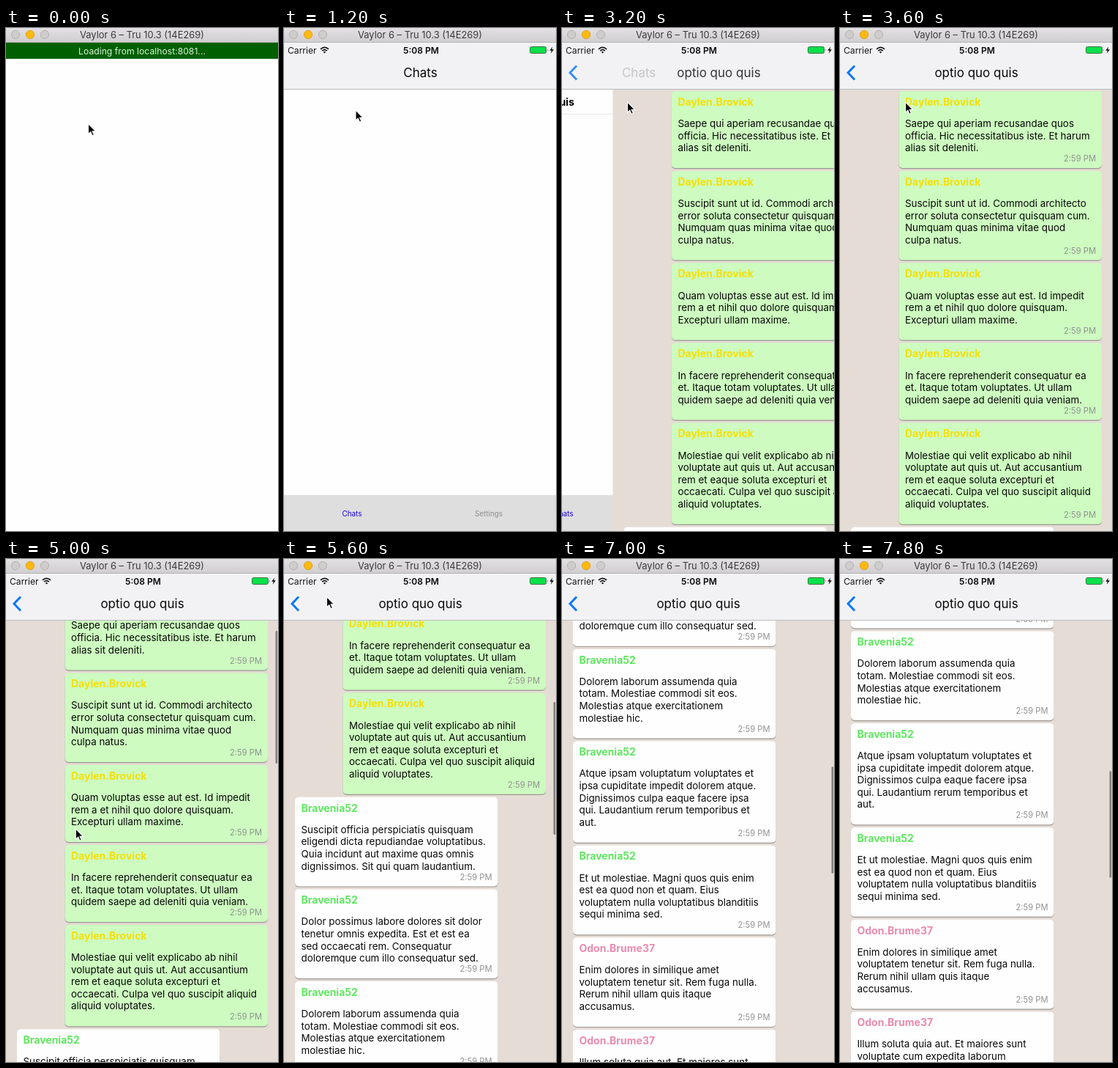
Recreate the animation shown at these times as an HTML page. Size 372 by 686 pixels, loop 8000 ms.

```html
<!DOCTYPE html>
<html lang="en">
<head>
<meta charset="utf-8">
<title>Chat demo</title>
<style>
  html, body { margin: 0; width: 100%; height: 100%; overflow: hidden; background: #fefefe; }
  svg { display: block; width: 100%; height: 100%; font-family: Inter, Roboto, "Liberation Sans", sans-serif; }
  text { white-space: pre; }
  .mid { text-anchor: middle; }
  .end { text-anchor: end; }
  .bold { font-size: 14px; font-weight: 700; }
  .body { font-size: 13.4px; fill: #080808; }
  .time { font-size: 11.2px; fill: #929292; }
  .nav { font-size: 17px; fill: #0a0a0a; }
  .tab { font-size: 9.9px; }
</style>
</head>
<body>
<svg viewBox="0 0 372 686" preserveAspectRatio="none">
  <rect width="372" height="686" fill="#fefefe"/>

  <g id="list">
    <rect y="83" width="372" height="603" fill="#fefefe"/>
    <g id="row">
      <text class="bold" x="11" y="105.6">optio quo quis</text>
      <path d="M0 117.5H372" stroke="#e6e6e6"/>
    </g>
    <rect y="637" width="372" height="49" fill="#dedede"/>
    <text class="tab mid" x="93" y="666" fill="#1a00e0">Chats</text>
    <text class="tab mid" x="280" y="666" fill="#8c8c8c">Settings</text>
  </g>

  <g id="chat">
    <rect y="83" width="372" height="603" fill="#e5dcd5"/>
    <g id="feed"></g>
    <rect id="bar" x="368.6" width="2.6" rx="1.3" fill="#827e7a"/>
  </g>

  <g id="header">
    <rect y="20" width="372" height="63.5" fill="#f2f2f4"/>
    <path d="M0 83.5H372" stroke="#bcbcbe"/>
    <text id="listTitle" class="nav mid" x="186.5" y="67.3">Chats</text>
    <text id="chatTitle" class="nav mid" x="186.5" y="67.3">optio quo quis</text>
    <path id="back" d="M20 51.5L11 61L20 70.5" fill="none" stroke="#0a78fa" stroke-width="3"/>
  </g>

  <g id="status">
    <text x="5" y="34.5" font-size="12.1" fill="#161616">Carrier</text>
    <g fill="none" stroke="#111" stroke-width="1.7">
      <path d="M50 28.8Q55.5 23.8 61 28.8"/>
      <path d="M52.2 31.2Q55.5 28.2 58.8 31.2"/>
    </g>
    <path d="M53.7 32.7Q55.5 31.2 57.3 32.7L55.5 34.6Z" fill="#111"/>
    <text class="mid" x="187.5" y="34.5" font-size="12.1" font-weight="600" fill="#0a0a0a">5:08 PM</text>
    <rect x="336.5" y="25.5" width="22" height="9" rx="2" fill="#0be04a" stroke="#3c7048"/>
    <path d="M360 28.2Q361.8 30 360 31.8Z" fill="#3c7048"/>
    <path d="M367.2 25.5L363.2 30.7H365.8L364.8 34.8L369 29.3H366.3Z" fill="#111"/>
  </g>

  <g id="loading">
    <rect y="20" width="372" height="22" fill="#006000"/>
    <text class="mid" x="186" y="35.6" font-size="12.2" fill="#d6f2d4">Loading from localhost:8081...</text>
  </g>

  <linearGradient id="chrome" x2="0" y2="1">
    <stop stop-color="#e2e0e2"/>
    <stop offset="1" stop-color="#cfcdcf"/>
  </linearGradient>
  <rect width="372" height="20" fill="url(#chrome)"/>
  <path d="M0 19.5H372" stroke="#b4b2b4"/>
  <g fill="#cfcdcc" stroke="#b4b2b0">
    <circle cx="13" cy="9" r="5.6"/>
    <circle cx="33" cy="9" r="5.6" fill="#ffb90f" stroke="#dfa01c"/>
    <circle cx="53" cy="9" r="5.6"/>
  </g>
  <text class="mid" x="186" y="14" font-size="12.9" fill="#3c3c3c">Vaylor 6 – Tru 10.3 (14E269)</text>

  <g id="cursor">
    <path d="M0 0V15.2L3.5 12L5.9 17.4L8.4 16.3L6 11.1H10.8Z" transform="scale(.94)" stroke="#fff" stroke-width="1.2"/>
  </g>
</svg>

<script>
const $ = id => document.getElementById(id);
const LOOP = 8000, STEP = 200, LINE = 16.6;

const people = {
  own: { name: "Daylen.Brovick", color: "#f6e000", x: 80.5, fill: "#cdfbc0" },
  second: { name: "Bravenia52", color: "#5ee85e", x: 15, fill: "#fefefe" },
  third: { name: "Odon.Brume37", color: "#ec8aae", x: 15, fill: "#fefefe" }
};

const messages = [
  ["own", "Saepe qui aperiam recusandae quos|officia. Hic necessitatibus iste. Et harum|alias sit deleniti."],
  ["own", "Suscipit sunt ut id. Commodi architecto|error soluta consectetur quisquam cum.|Numquam quas minima vitae quod|culpa natus."],
  ["own", "Quam voluptas esse aut est. Id impedit|rem a et nihil quo dolore quisquam.|Excepturi ullam maxime."],
  ["own", "In facere reprehenderit consequatur ea|et. Itaque totam voluptates. Ut ullam|quidem saepe ad deleniti quia veniam."],
  ["own", "Molestiae qui velit explicabo ab nihil|voluptate aut quis ut. Aut accusantium|rem et eaque soluta excepturi et|occaecati. Culpa vel quo suscipit aliquid|aliquid voluptates."],
  ["second", "Suscipit officia perspiciatis quisquam|eligendi dicta repudiandae voluptatibus.|Quia incidunt aut maxime quas omnis|dignissimos. Sit qui quam laudantium."],
  ["second", "Dolor possimus labore dolores sit dolor|tenetur omnis expedita. Est et est ea|sed occaecati rem. Consequatur|doloremque cum illo consequatur sed."],
  ["second", "Dolorem laborum assumenda quia|totam. Molestiae commodi sit eos.|Molestias atque exercitationem|molestiae hic."],
  ["second", "Atque ipsam voluptatum voluptates et|ipsa cupiditate impedit dolorem atque.|Dignissimos culpa eaque facere ipsa|qui. Laudantium rerum temporibus et|aut."],
  ["second", "Et ut molestiae. Magni quos quis enim|est ea quod non et quam. Eius|voluptatem nulla voluptatibus blanditiis|sequi minima sed."],
  ["third", "Enim dolores in similique amet|voluptatem tenetur sit. Rem fuga nulla.|Rerum nihil ullam quis itaque|accusamus."],
  ["third", "Illum soluta quia aut. Et maiores sunt|voluptate cum expedita laborum|quia."]
];

function bubble(who, lines, top) {
  const { name, color, x, fill } = people[who];
  const h = 55.2 + LINE * lines.length;
  const box = (dy, paint, extra = "") =>
    `<rect x="${x}" y="${top + dy}" width="277.5" height="${h}" rx="5" fill="${paint}" ${extra}/>`;
  const text = (cls, tx, dy, str, extra = "") =>
    `<text class="${cls}" x="${tx}" y="${top + dy}" ${extra}>${str}</text>`;
  return box(1.2, "#8a8682", 'opacity=".8"') + box(0, fill) +
    text("bold", x + 8.5, 19.8, name, `fill="${color}"`) +
    lines.map((s, i) => text("body", x + 8.5, 48.9 + i * LINE, s)).join("") +
    text("time end", x + 269.5, 46.4 + LINE * lines.length, "2:59 PM");
}

let nextTop = 86;
$("feed").innerHTML = messages.map(([who, str]) => {
  const lines = str.split("|");
  const out = bubble(who, lines, nextTop);
  nextTop += 59.2 + LINE * lines.length;
  return out;
}).join("");

const clamp = v => Math.max(0, Math.min(1, v));
const mix = (a, b, p) => a + (b - a) * p;
const fade = (id, v) => $(id).setAttribute("opacity", +v);
const move = (id, x, y) => $(id).setAttribute("transform", `translate(${x} ${y})`);

// One upward flick: the content follows the pointer, then coasts to rest.
const GRAB = 4700, DROP = 5600, COAST = 5692, DRAG = 356, REST = 839;

function scrollAt(t) {
  if (t <= DROP) return DRAG * clamp((t - GRAB) / (DROP - GRAB)) ** 2;
  return REST - (REST - DRAG) * Math.exp(-Math.max(0, t - COAST) / 470);
}

// Pointer path outside the flick: time, x, y
const path = [
  [0, 112.5, 130.5], [400, 98, 112], [1200, 98, 112], [2600, 89.5, 101],
  [3600, 89.5, 101], [GRAB, 100, 51.5 + DRAG]
];
function pointerAt(t) {
  if (t >= GRAB) {
    const p = Math.min(1, scrollAt(t) / DRAG);
    return [mix(100, 58.5, p), 51.5 + DRAG * (1 - p)];
  }
  const i = path.findIndex(k => k[0] > t);
  const [a, b] = [path[i - 1], path[i]];
  const p = (t - a[0]) / (b[0] - a[0]);
  return [mix(a[1], b[1], p), mix(a[2], b[2], p)];
}

function draw(t) {
  fade("loading", 1 - clamp(t / 400));
  fade("status", t >= 200);
  fade("header", t >= 1200);
  fade("list", t >= 1200 && t < 3600);
  fade("row", t >= 1600);

  const p = clamp((t - 2900) / 700);
  const push = 1 - (1 - p) ** 3;
  move("list", -112 * push, 0);
  move("chat", 372 * (1 - push), 0);
  fade("chat", push > 0);
  fade("listTitle", 1 - push);
  fade("chatTitle", push);
  fade("back", push);
  move("listTitle", -100 * push, 0);
  move("chatTitle", 150 * (1 - push), 0);

  const y = scrollAt(t);
  const grown = t > DROP;
  move("feed", 0, -y);
  fade("bar", y > 0);
  $("bar").setAttribute("y", 86 + y * (grown ? 0.2437 : 0.306));
  $("bar").setAttribute("height", grown ? 145.5 : 181);

  move("cursor", ...pointerAt(t));
  fade("cursor", t < 6800);
}

function tick() {
  draw(Math.floor(performance.now() % LOOP / STEP) * STEP);
  requestAnimationFrame(tick);
}
tick();
</script>
</body>
</html>
```
